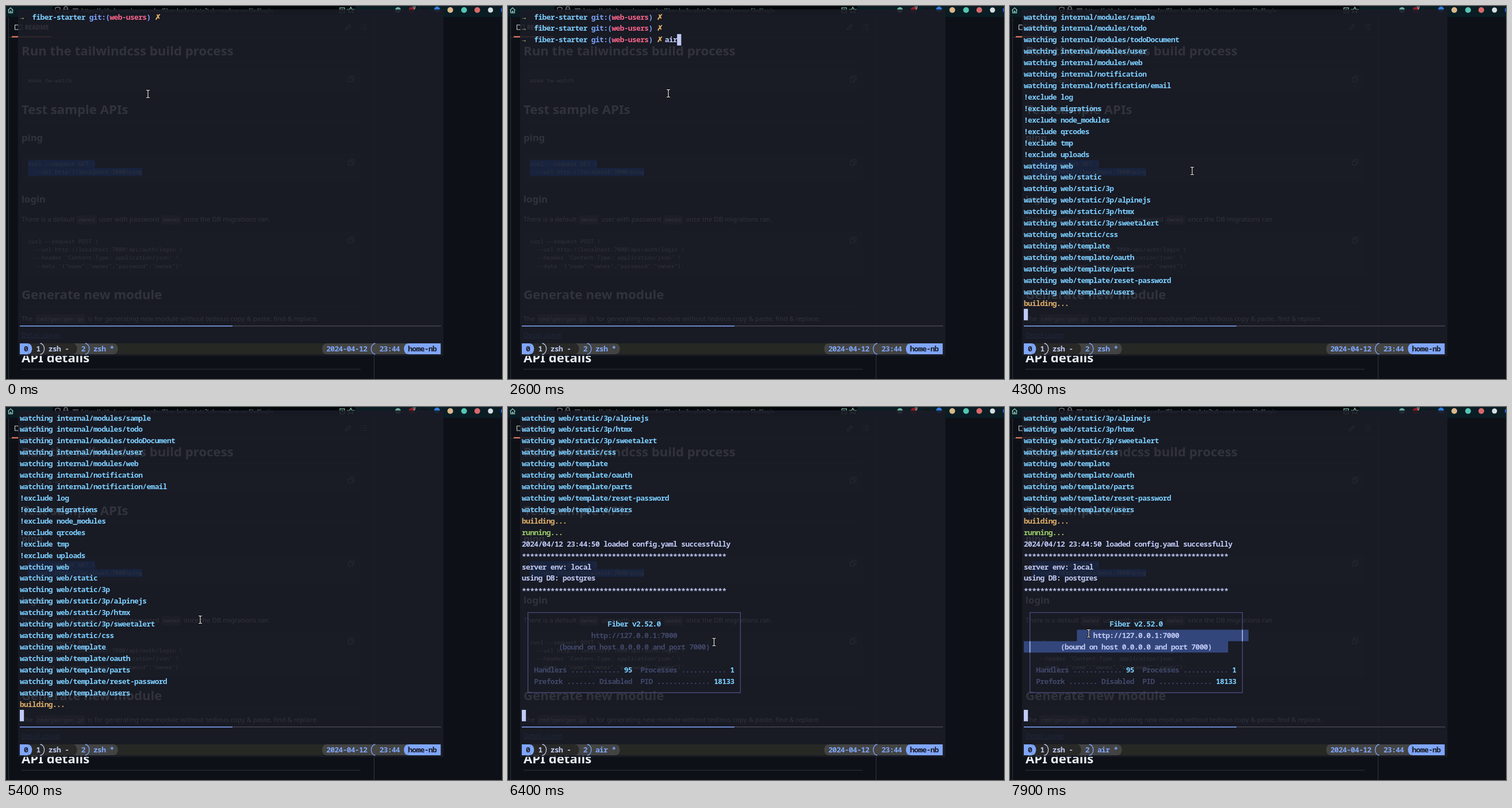
An HTML page for the animation above (8 s loop, 863 by 649 pixels).

```html
<!DOCTYPE html>
<html lang="en">
<head>
<meta charset="utf-8">
<title>Terminal session</title>
<style>
  html, body { margin: 0; width: 100%; height: 100%; overflow: hidden; background: #0d1117; }
  svg { display: block; }
  text { white-space: pre; }
  .page { font-family: "Noto Sans", sans-serif; font-size: 11.44px; fill: #e6edf3; }
  .h1 { font-size: 22.2px; font-weight: 700; }
  .h2 { font-size: 16.7px; font-weight: 700; }
  .code { font-family: "Noto Sans Mono", monospace; font-size: 9.72px; }
  .icon { fill: none; stroke: #8b949e; stroke-width: 1.1; }
  .term { font-family: "Noto Sans Mono", monospace; font-size: 13px; font-weight: 600; letter-spacing: -0.69px; }
</style>
</head>
<body>
<svg id="stage" width="863" height="649" viewBox="0 0 863 649">
  <defs><clipPath id="picked"><path id="pickedClip"/></clipPath></defs>
  <g id="page" class="page"></g>
  <rect x="21" y="6" width="740" height="603" fill="#1a1b26" opacity=".89"/>
  <g class="term">
    <g id="status"></g>
    <g id="screen"></g>
    <g id="banner">
      <path id="frame" fill="none" stroke="#4a4a78" stroke-width="1.4"/>
      <path id="pickedFill" fill="#33467c"/>
      <g id="pickedText" clip-path="url(#picked)"></g>
    </g>
    <rect id="cursor" width="7.2" height="19.9" fill="#c0caf5"/>
  </g>
  <g id="mouse" fill="none" stroke-linecap="square">
    <path id="beam" d="M-2.5-6.5H-1L0-5.5L1-6.5H2.5M0-5.5V5.5M-2.5 6.5H-1L0 5.5L1 6.5H2.5" stroke="#111" stroke-width="3"/>
    <use href="#beam" id="beamTop"/>
    <path d="M-2.5-6.5H-1L0-5.5L1-6.5H2.5M0-5.5V5.5M-2.5 6.5H-1L0 5.5L1 6.5H2.5" stroke="#e8e8e8" stroke-width="1.2"/>
  </g>
</svg>
<script>
const NS = 'http://www.w3.org/2000/svg';
const $ = id => document.getElementById(id);
$('beamTop').remove();

function add(parent, tag, attrs, content) {
  const el = document.createElementNS(NS, tag);
  for (const k in attrs) el.setAttribute(k, attrs[k]);
  if (content !== undefined) el.textContent = content;
  parent.append(el);
  return el;
}

// ---- web page behind the terminal ----
const page = $('page');
const rect = (x, y, width, height, fill, rx = 0) => add(page, 'rect', { x, y, width, height, fill, rx });
const label = (x, y, s, cls = '', fill = '') => add(page, 'text', { x, y, class: cls, ...(fill && { fill }) }, s);
const icon = d => add(page, 'path', { d, class: 'icon' });
const dot = (cx, cy, r, fill) => add(page, 'circle', { cx, cy, r, fill });

function drawPage() {
  rect(0, 0, 863, 649, '#0d1117');
  rect(0, 0, 863, 19, '#0a1d24');
  rect(81, 0, 527, 15, '#02070a', 3);
  icon('M3.5 7.5L8 3L12.500 7.500M4.500 7V12H11.500V7M7 12V9H9V12').style.stroke = '#9edcc9';
  icon('M86 3L90 2L94 3V7Q93 11 90 12Q87 11 86 7ZM101 6V4A3 3 0 0 1 107 4V6M100 6H108V12H100ZM116 5H126M116 9H126');
  label(131, 11, 'https://github.com/somecoder/fiber-boilerplate?tab=readme-ov-file#login', '', '#7fa3a3').style.fontSize = '9.6px';
  const tools = icon('M581 3H589V12H581ZM583 6H587M583 8H587M600 2L602 6L606 6L603 9L604 12L600 10L596 12L597 9L594 6L598 6Z');
  tools.style.stroke = '#9edcc9';
  dot(682, 7, 5, '#6fae9f');
  dot(706, 7, 5.5, '#8c1c24');
  label(708, 6, '9', '', '#eee').style.fontSize = '8px';
  rect(723, 3, 10, 8, '#10171c', 1);
  dot(750, 6, 5, '#2f7ee0');
  dot(773, 7, 5, '#d9b88a');
  dot(797, 7, 5, '#54c7b4');
  dot(820, 7, 5, '#d8696a');
  dot(843, 7, 4.500, '#d5dde0');
  rect(861, 4, 2, 6, '#2456c8');

  rect(4, 20, 1, 629, '#30363d');
  rect(640, 20, 1, 629, '#30363d');
  rect(5, 54, 635, 1, '#30363d');
  rect(10, 52.500, 69, 2, '#f78166');
  icon('M15.500 33H20.500L22 34L23.500 33H28V41H23.500L22 42L20.500 41H15.500ZM22 34V42').style.stroke = '#c9d1d9';
  label(33, 41, 'README').style.cssText = 'font-size:10px;font-weight:600';
  icon('M590.500 41.500V39L597 32.500L599.500 35L593 41.500ZM617 33H618.500M620.500 33H628M617 37H618.500M620.500 37H628M617 41H618.500M620.500 41H628');

  const h1 = (y, s) => { label(27, y, s, 'h1'); rect(27, y + 12, 590, 1, '#30363d'); };
  h1(86, 'Run the tailwindcss build process');
  h1(187.500, 'Test sample APIs');
  h1(510, 'Generate new module');
  h1(619.500, 'API details');
  label(27, 235, 'ping', 'h2');
  label(27, 342, 'login', 'h2');

  const block = (y, h, first, lines) => {
    rect(27, y, 590, h, '#161b22', 4);
    icon(`M595.500 ${y + 13}h7v7h-7zM598.500 ${y + 13}v-3h7v7h-3`);
    lines.forEach((s, i) => label(38.500, first + i * 14.2, s, 'code'));
  };
  block(112, 34, 132.500, ['make tw-watch']);
  block(257, 50, 0, []);
  rect(38, 268, 117, 13.500, '#0a64ff');
  rect(38, 282, 199, 13.500, '#0a64ff');
  ['curl --request GET \\', '  --url http://localhost:7000/ping']
    .forEach((s, i) => label(38.500, 278 + i * 14.4, s, 'code'));
  block(392, 78, 413, [
    'curl --request POST \\',
    '  --url http://localhost:7000/api/auth/login \\',
    "  --header 'Content-Type: application/json' \\",
    '  --data \'{"name":"owner","password":"owner"}\''
  ]);

  const chip = (x, y, w, s) => { rect(x, y - 11, w, 16, '#343941', 4); label(x + 3, y, s, 'code'); };
  label(27, 375, 'There is a default');
  chip(123, 375, 35, 'owner');
  label(162, 375, 'user with password');
  chip(270, 375, 35, 'owner');
  label(309, 375, 'once the DB migrations ran.');
  label(27, 547.500, 'The');
  chip(51, 547.500, 87, 'cmd/gen/gen.go');
  label(142, 547.500, 'is for generating new module without tedious copy & paste, find & replace.');
  label(27, 576, 'Detail usage', '', '#4493f8').style.textDecoration = 'underline';
}

// ---- terminal grid ----
const CW = 7.11, RH = 19.92;
const colX = c => 24 + c * CW;
const rowY = r => 9 + r * RH;
const FG = '#c0caf5', CYAN = '#7dcfff', BLUE = '#7aa2f7', RED = '#f7648a',
      GREEN = '#9ece6a', YELLOW = '#e0af68', DIM = '#414868';

// A line is a list of runs: [column, colour, text]
function drawLine(parent, row, runs, colour) {
  for (const [c, fill, s] of runs) {
    const drop = s.startsWith('**') ? 7 : 4.6;
    add(parent, 'text', { x: colX(c), y: rowY(row + 0.5) + drop, fill: colour || fill }, s);
  }
}

const prompt = (cmd = '') => [
  [0, GREEN, '→'], [3, CYAN, 'fiber-starter'], [17, BLUE, 'git:('],
  [22, RED, 'web-users'], [31, BLUE, ')'], [33, YELLOW, '✗'], [35, FG, cmd]
];
const line = (colour, s) => [[0, colour, s]];
const stars = line(FG, '*'.repeat(50));
const dots = n => '.'.repeat(n);

const watched = (root, names) => names.split(' ').map(n => line(CYAN, 'watching ' + root + n));
const urlLine = [[17, DIM, 'http://127.0.0.1:7000']];
const hostLine = [[9, DIM, '(bound on host 0.0.0.0 and port 7000)']];

const log = [
  ...watched('internal/', 'modules/sample modules/todo modules/todoDocument modules/user modules/web notification notification/email'),
  ...'log migrations node_modules qrcodes tmp uploads'.split(' ').map(n => line(CYAN, '!exclude ' + n)),
  ...watched('web', ' /static /static/3p /static/3p/alpinejs /static/3p/htmx /static/3p/sweetalert /static/css'),
  ...watched('web/template', ' /oauth /parts /reset-password /users'),
  line(YELLOW, 'building...'),
  line(GREEN, 'running...'),
  line(FG, '2024/04/12 23:44:50 loaded config.yaml successfully'),
  stars, line(FG, 'server env: local'), line(FG, 'using DB: postgres'), stars,
  [], [],
  [[21, CYAN, 'Fiber v2.52.0']], urlLine, hostLine, [],
  [[3, DIM, `Handlers ${dots(12)}`], [25, CYAN, '95'], [29, DIM, `Processes ${dots(11)}`], [51, CYAN, '1']],
  [[3, DIM, `Prefork ${dots(7)} Disabled`], [29, DIM, `PID ${dots(13)}`], [47, CYAN, '18133']]
];

const P = prompt();
const screens = [
  [0, [P]],
  [1900, [P, P]],
  [2000, [P, P, P]],
  [2300, [P, P, prompt('a')]],
  [2500, [P, P, prompt('ai')]],
  [2600, [P, P, prompt('air')]],
  [2900, log.slice(0, 26)],
  [6200, log.slice(1, 27)],
  [6400, log.slice(16)]
].map(([t, lines]) => {
  const g = add($('screen'), 'g', {});
  lines.forEach((runs, r) => drawLine(g, r, runs));
  return [t, g];
});

// time, column (-1 = blinked off), row
const cursorSteps = [
  [0, -1, 0], [500, 35, 0], [1000, -1, 0], [1500, 35, 0], [1900, 35, 1], [2000, 35, 2],
  [2300, 36, 2], [2500, 37, 2], [2600, 38, 2], [2900, 0, 26], [3500, -1, 26], [4000, 0, 26]
];

// time, x, y
const mousePath = [
  [0, 247, 153], [200, 247, 153], [500, 279, 152], [3900, 279, 152],
  [4000, 283, 178], [4300, 317, 287], [4400, 317, 287], [5200, 337.5, 362.5], [5300, 337.5, 362.5],
  [5400, 338, 370], [5600, 345, 379], [5900, 341, 393], [6000, 341, 393], [6200, 341, 401],
  [6600, 376, 417], [6700, 376, 417], [7200, 273, 413], [7400, 119, 394], [7700, 119, 394],
  [7900, 137, 394], [8000, 137, 394]
];

const frameD = `M${colX(1.5)} ${rowY(17.5)}H${colX(53.5)}V${rowY(24.5)}H${colX(1.5)}Z`;
$('frame').setAttribute('d', frameD);
drawLine($('pickedText'), 19, urlLine, FG);
drawLine($('pickedText'), 20, hostLine, FG);
add($('pickedText'), 'path', { d: frameD, fill: 'none', stroke: FG, 'stroke-width': 1.4 });

let job;
function drawStatus() {
  const g = $('status');
  const top = 587, h = 19;
  const bar = (a, b, fill) => add(g, 'rect', { x: colX(a), y: top, width: (b - a) * CW, height: h, fill });
  const cap = (c, dir, fill, stroke = 'none') => add(g, 'path', {
    d: `M${colX(c)} ${top}a${CW} ${h / 2} 0 0 ${dir} 0 ${h}`, fill, stroke, 'stroke-width': 1.3
  });
  const put = (c, fill, s) => add(g, 'text', { x: colX(c), y: 601, fill }, s);
  const pill = '#7fa6fb', grey = '#434443', dark = '#282927';

  add(g, 'rect', { x: 24, y: 556, width: 733, height: 1.3, fill: '#4a4a52' });
  add(g, 'rect', { x: 24, y: 556, width: 370, height: 1.5, fill: pill });
  bar(0, 103, '#262824');
  bar(13, 23, grey);
  cap(23, 1, grey);
  bar(2, 13, dark);
  cap(13, 1, dark);
  bar(0, 2, pill);
  cap(2, 1, pill);
  bar(75, 95, grey);
  cap(75, 0, grey);
  bar(95, 103, pill);
  cap(95, 0, pill);
  cap(5, 1, 'none', FG);
  cap(16, 1, 'none', pill);
  cap(87, 0, 'none', pill);

  put(1, '#1a1b26', '0');
  put(4, FG, '1');
  put(7, FG, 'zsh -');
  put(15, pill, '2');
  job = put(18, pill, 'zsh *');
  put(75, pill, '2024-04-12');
  put(88, pill, '23:44');
  put(95, '#1a1b26', 'home-nb');
}

// ---- playback ----
const LOOP = 8000, STEP = 100;
const current = (steps, t) => steps.findLast(s => s[0] <= t);
const show = (el, on) => el.setAttribute('visibility', on ? 'visible' : 'hidden');

function mouseAt(t) {
  const i = mousePath.findIndex(p => p[0] > t);
  const [t0, x0, y0] = mousePath[i - 1], [t1, x1, y1] = mousePath[i];
  const k = (t - t0) / (t1 - t0);
  return [x0 + (x1 - x0) * k, y0 + (y1 - y0) * k];
}

// The dragged selection trails the pointer slightly
function selectionAt(t) {
  if (t < 6800) return '';
  const [x, y] = mouseAt(Math.min(t - 40, 7700));
  const col = Math.floor((x - 24) / CW);
  const strip = (r, a, b) => `M${colX(a)} ${rowY(r)}H${colX(b)}V${rowY(r + 1)}H${colX(a)}Z`;
  return y < rowY(20) ? strip(19, col, 55) + strip(20, 0, 50) : strip(20, col, 50);
}

function render(t) {
  const [, active] = current(screens, t);
  for (const [, g] of screens) g.style.display = g === active ? '' : 'none';
  $('banner').style.display = t >= 6400 ? '' : 'none';
  job.textContent = t >= 6200 ? 'air *' : 'zsh *';

  const [, col, row] = current(cursorSteps, t);
  show($('cursor'), col >= 0);
  $('cursor').setAttribute('x', colX(col));
  $('cursor').setAttribute('y', rowY(row));

  const [x, y] = mouseAt(t);
  show($('mouse'), t < 3700 || t >= 4000);
  $('mouse').setAttribute('transform', `translate(${x} ${y})`);

  const d = selectionAt(t);
  $('pickedFill').setAttribute('d', d);
  $('pickedClip').setAttribute('d', d);
}

drawPage();
drawStatus();
const start = performance.now();
let last = -1;
function tick() {
  const t = Math.floor((performance.now() - start) % LOOP / STEP) * STEP;
  if (t !== last) render(last = t);
  requestAnimationFrame(tick);
}
tick();
</script>
</body>
</html>
```
